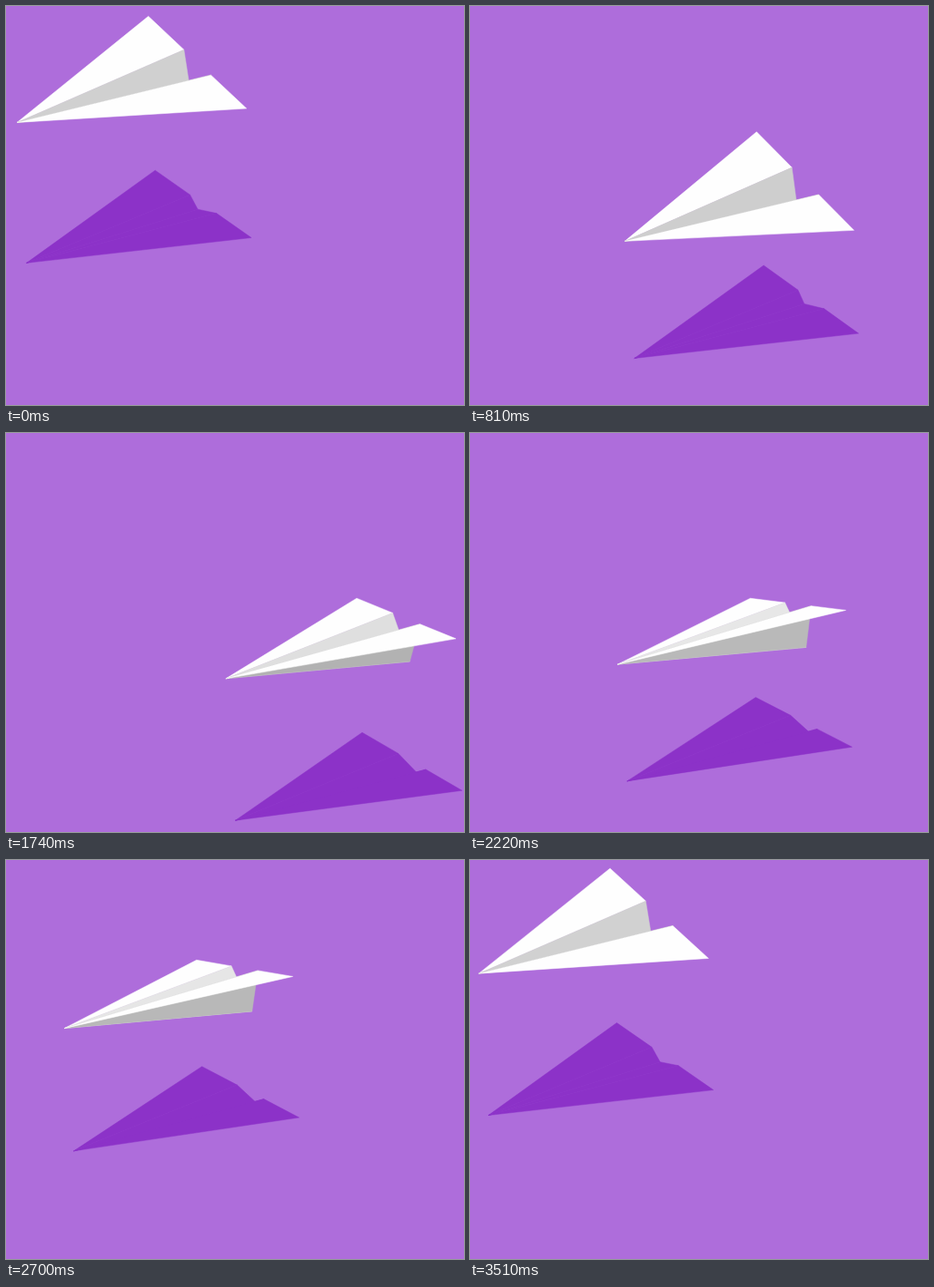
Recreate the animation shown at these times as an HTML page with a canvas. Size 504 by 440 pixels, loop 3.54 s.

```html
<!DOCTYPE html>
<html lang="en">
<head>
<meta charset="utf-8">
<title>Paper plane</title>
<style>
  html, body { margin: 0; width: 100%; height: 100%; overflow: hidden; background: #ae6ddb; }
  canvas { display: block; }
</style>
</head>
<body>
<canvas id="stage" width="504" height="440"></canvas>
<script>
const ctx = document.getElementById('stage').getContext('2d');
const LOOP = 3540;
const SHADOW = '#8c32c8';

// Nose positions across the stage, evenly spaced over the loop.
const STOPS = [12, 68, 147.5, 219.5, 246, 239.5, 181.5, 108.5, 42, 6.5];

const gray = v => `rgb(${v},${v},${v})`;
const wave = (t, peak, cycles = 1) => Math.cos((t - peak) / LOOP * cycles * 2 * Math.PI);

// Closed Catmull-Rom curve through the stops.
function glide(t) {
  const n = STOPS.length, s = t / LOOP * n, i = Math.floor(s), u = s - i;
  const [a, b, c, d] = [-1, 0, 1, 2].map(j => STOPS[(i + j + n) % n]);
  return b + u / 2 * (c - a + u * (2 * a - 5 * b + 4 * c - d + u * (3 * (b - c) + d - a)));
}

function face(nose, p, q, color) {
  ctx.fillStyle = ctx.strokeStyle = color;
  ctx.beginPath();
  ctx.moveTo(...nose);
  ctx.lineTo(...p);
  ctx.lineTo(...q);
  ctx.closePath();
  ctx.fill();
  ctx.stroke();
}

// Tips and folds lie on one line, mirrored about the tail's centre.
function glider(x, y, tail, span, keel, wing, inner, outer) {
  const nose = [x, y];
  const at = (f, [dx, dy] = span) => [x + tail[0] + f * dx, y + tail[1] + f * dy];
  const bottom = at(1, keel);
  face(nose, at(-1), at(-.275), wing);
  face(nose, at(-.275), bottom, inner);
  face(nose, at(.275), bottom, outer);
  face(nose, at(.275), at(1), wing);
}

function draw() {
  const t = performance.now() % LOOP;
  const x = glide(t), u = x - 11.6;
  const ground = 283 + .75 * u - .000537 * u * u;
  const height = 143.8 + 18.5 * wave(t, 1510, 2);
  const roll = .513 + .492 * wave(t, 2325) - .054 * wave(t, 0, 2);
  const swell = roll * (1 - roll);

  ctx.fillStyle = '#ae6ddb';
  ctx.fillRect(0, 0, 504, 440);
  ctx.lineWidth = .5;
  ctx.lineJoin = 'bevel';

  glider(x + 10.5, ground, [194.5, -65],
    [50.5 + 2.5 * roll + 13 * swell, 38 - 3 * roll - 7.7 * roll * roll],
    [-10.5 + 24 * roll, 3 + 15 * roll],
    SHADOW, SHADOW, SHADOW);
  glider(x, ground - height, [198.6, -66.3],
    [52.5 + 10 * swell, 61 - 54.5 * roll],
    [-8.6 + 17.5 * roll, 47.5],
    '#fefefe', gray(Math.round(203 + 28 * roll)), gray(Math.round(162 + 23 * roll)));

  requestAnimationFrame(draw);
}
draw();
</script>
</body>
</html>
```
